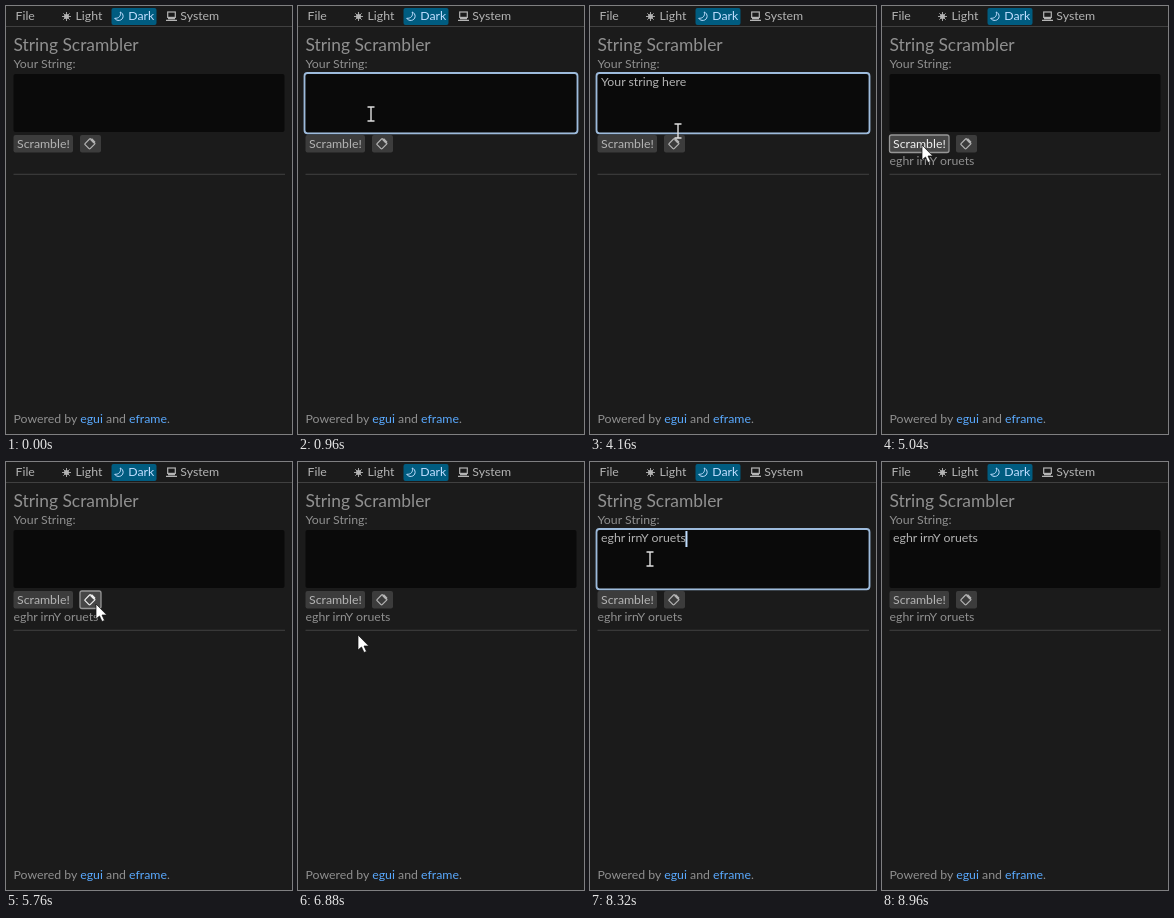
An HTML page that plays this animation: 286x428 px, repeating every 9.36 s.

```html
<!DOCTYPE html>
<html lang="en">
<head>
<meta charset="utf-8">
<title>String Scrambler</title>
<style>
html, body { margin: 0; width: 100%; height: 100%; overflow: hidden; background: #1b1b1b; }
svg { display: block; }
text { font: 12.3px Lato, "Open Sans", sans-serif; fill: #909090; white-space: pre; }
.lit { fill: #b4b4b4; }
.link { fill: #5aaaff; }
.line { stroke: #404040; }
.icon { fill: none; stroke: #b4b4b4; stroke-width: 1.2; }
.button { fill: #3c3c3c; }
.button.hover { fill: #464646; stroke: #969696; stroke-width: 1.3; }
.button.press { fill: #373737; stroke: #fff; stroke-width: 1.3; }
.hover + .lit, .press + .lit { fill: #f0f0f0; }
.hover + .icon, .press + .icon { stroke: #f0f0f0; }
</style>
</head>
<body>
<svg width="286" height="428" viewBox="0 0 286 428">
  <rect width="286" height="428" fill="#1b1b1b"/>

  <text class="lit" x="9.5" y="14">File</text>
  <g class="icon" transform="translate(60.5 10.5)">
    <circle r="1.9" fill="#b4b4b4"/>
    <path d="M0 -4.5v9M-4.5 0h9M-3.2 -3.2l6.4 6.4M3.2 -3.2l-6.4 6.4" stroke-width=".9"/>
  </g>
  <text class="lit" x="69.5" y="14">Light</text>
  <rect x="105.5" y="2" width="45" height="17" rx="2" fill="#005c80"/>
  <path d="M114.2 6c1.2 4-1.4 6.5-5.5 6.3c1.8 3.2 8 2.9 8.4-1.8c.1-2-1-3.7-2.9-4.5z" fill="none" stroke="#c0deff"/>
  <text x="122.3" y="14" style="fill:#c0deff">Dark</text>
  <g class="icon">
    <rect x="161.7" y="6" width="7.6" height="5.4"/>
    <path d="M160 14.3h11M162 12.6h7"/>
  </g>
  <text class="lit" x="174.3" y="14">System</text>
  <path class="line" d="M0 20.5H286"/>

  <text x="7.5" y="45" style="font-size:17.4px">String Scrambler</text>
  <text x="7.5" y="62.4">Your String:</text>

  <rect x="7.5" y="68" width="271" height="58" rx="2" fill="#0a0a0a"/>
  <rect id="ring" x="6.5" y="67" width="273" height="60.3" rx="3" fill="none" stroke-width="1.8"/>
  <text id="input" class="lit" x="11" y="80"></text>
  <rect id="caret" y="69" width="2" height="16" fill="#c0deff"/>

  <rect id="scramble" class="button" x="7.5" y="129" width="59.5" height="17.5" rx="2"/>
  <text class="lit" x="11" y="141.6">Scramble!</text>
  <rect id="copy" class="button" x="74" y="129" width="21" height="17.5" rx="2"/>
  <g class="icon" transform="translate(84 137.7) rotate(45)">
    <rect x="-3.6" y="-3.8" width="7.2" height="8" rx=".8"/>
    <path d="M-2.4 -4h4.8" stroke-width="2.6"/>
  </g>
  <text id="result" x="7.5" y="159.3"></text>
  <path class="line" d="M7.5 168.3H279"/>

  <text x="7.5" y="416.5">Powered by <tspan class="link">egui</tspan> and <tspan class="link">eframe</tspan>.</text>

  <path id="arrow" d="M0 0V15L3.5 12L6 17.5L8.5 16.4L6 11H10.8Z" fill="#fff" stroke="#111" stroke-width=".7"/>
  <path id="beam" d="M-3.5 -7h7M0 -7V7M-3.5 7h7" fill="none" stroke="#e0e0e0" stroke-width="1.4"/>
</svg>
<script>
const LOOP = 9360, STEP = 80, BLINK = 480;
const $ = id => document.getElementById(id);
const phrase = "Your string here", scrambled = "eghr irnY oruets";
const at = {
  enter: 160, focus: 560, press: 4640, release: 5040, copy: 5840,
  refocus: 8000, paste: 8320, blur: 8800, leave: 8960
};

// Pointer moves: start time, end time, destination
const entry = [97, 153];
const moves = [
  [160, 480, 73, 108],
  [4080, 4160, 88, 125],
  [4160, 4400, 70, 190],
  [4400, 4640, 40, 139],
  [5280, 5680, 90, 142],
  [6160, 6880, 60, 173],
  [6960, 7680, 60, 97],
  [8320, 8800, 186.5, 176]
];

const between = (t, a, b) => t >= a && t < b;
const clamp = k => Math.min(1, Math.max(0, k));
const show = (id, on) => $(id).style.display = on ? "" : "none";

function pointerAt(t) {
  let [x, y] = entry;
  for (const [start, end, toX, toY] of moves) {
    const k = clamp((t - start) / (end - start));
    x += (toX - x) * k;
    y += (toY - y) * k;
  }
  return [x, y];
}

// Typing starts hesitantly, then runs at a quick steady pace
function inputAt(t) {
  if (t >= at.paste) return scrambled;
  if (t >= at.release) return "";
  const count = Math.max(0, (t - 1296) / 224, (t - 2256) / 88);
  return phrase.slice(0, Math.floor(count));
}

function setButton(id, hover, pressed) {
  $(id).setAttribute("class", "button" + (pressed ? " press" : hover ? " hover" : ""));
}

function draw(now) {
  const t = Math.floor(now % LOOP / STEP) * STEP;
  const visible = between(t, at.enter, at.leave);
  const [x, y] = visible ? pointerAt(t) : [-50, -50];
  const over = (left, top, right, bottom) => between(x, left, right) && between(y, top, bottom);
  const inField = over(7, 67, 279, 127);
  const focused = between(t, at.focus, at.press) || between(t, at.refocus, at.blur);

  show("ring", focused || inField);
  $("ring").setAttribute("stroke", focused ? "#9dbbdc" : "#8c8c8c");
  $("input").textContent = inputAt(t);
  $("result").textContent = t >= at.release ? scrambled : "";
  show("caret", focused && t % (2 * BLINK) >= BLINK);
  $("caret").setAttribute("x", 10.5 + $("input").getComputedTextLength());

  setButton("scramble", over(7, 129, 67, 147), between(t, at.press, at.release));
  setButton("copy", over(74, 129, 95, 147), between(t, at.copy, at.copy + 2 * STEP));

  show("arrow", visible && !inField);
  show("beam", inField);
  for (const id of ["arrow", "beam"]) $(id).setAttribute("transform", `translate(${x} ${y})`);
}

function frame() {
  draw(performance.now());
  requestAnimationFrame(frame);
}
frame();
</script>
</body>
</html>
```
